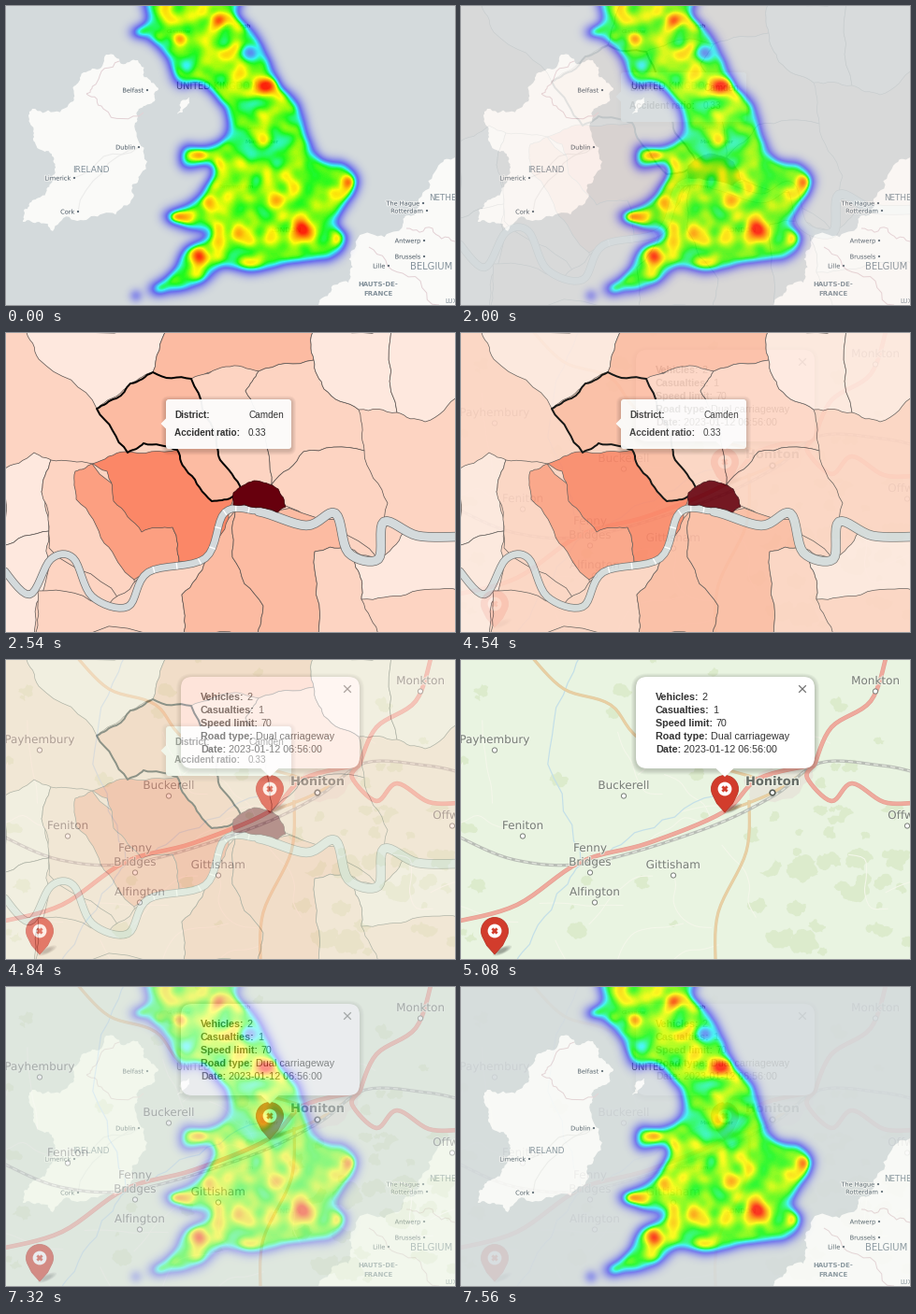
Recreate the animation shown at these times as a matplotlib script. Size 480 by 320 pixels, loop 7.62 s.

```python
from itertools import count

import numpy as np
import matplotlib.pyplot as plt
from matplotlib.animation import FuncAnimation
from matplotlib.colors import LinearSegmentedColormap
from matplotlib.patches import Circle, Ellipse, FancyBboxPatch, Polygon
from matplotlib.path import Path
from matplotlib.patheffects import withStroke

W, H, DPI = 480, 320, 100
STEP, LOOP = 20, 7620
PX = 72 / DPI  # points per pixel

fig = plt.figure(figsize=(W / DPI, H / DPI), dpi=DPI)
layer = count(1)  # later artists always lie on top


def stage(color="white"):
    ax = fig.add_axes([0, 0, 1, 1])
    ax.set(xlim=(0, W), ylim=(H, 0))
    ax.axis("off")
    area(ax, [(0, 0), (W, 0), (W, H), (0, H)], color)
    return ax


# ---------- drawing helpers ----------

def rough(pts, amp=0.1, depth=3, closed=True):
    """Break each side at a displaced midpoint; shared sides break alike."""
    pts = [tuple(map(float, p)) for p in pts]
    for _ in range(depth):
        out = []
        ends = pts[1:] + (pts[:1] if closed else [])
        for p, q in zip(pts, ends):
            (ax, ay), (bx, by) = sorted((p, q))
            k = amp * np.sin(12.9 * ax + 7.3 * ay + 3.1 * bx + 5.7 * by)
            out += [p, ((ax + bx) / 2 - k * (by - ay), (ay + by) / 2 + k * (bx - ax))]
        pts = out if closed else out + [pts[-1]]
    return pts


def smooth(pts, n=8):
    """Catmull-Rom curve through the points."""
    p = np.array([pts[0], *pts, pts[-1]], float)
    t = np.linspace(0, 1, n, endpoint=False)[:, None]
    parts = [
        0.5 * (2 * b + (c - a) * t + (2 * a - 5 * b + 4 * c - d) * t**2
               + (3 * b - a - 3 * c + d) * t**3)
        for a, b, c, d in zip(p, p[1:], p[2:], p[3:])
    ]
    return np.vstack(parts + [p[-1:]])


def put(ax, patch):
    patch.set_zorder(next(layer))
    ax.add_patch(patch)


def area(ax, pts, fill, edge="none", lw=0.0, **kw):
    put(ax, Polygon(pts, fc=fill, ec=edge, lw=lw * PX, joinstyle="round", **kw))


def dot(ax, x, y, r, fill, edge="none", lw=0.0):
    put(ax, Circle((x, y), r, fc=fill, ec=edge, lw=lw * PX))


def line(ax, pts, color, lw, **kw):
    x, y = np.array(pts, float).T
    kw.setdefault("solid_capstyle", "butt")
    ax.plot(x, y, color=color, lw=lw * PX, zorder=next(layer), **kw)


def cross(ax, x, y, r, color, lw):
    for s in (-r, r):
        line(ax, [(x - r, y - s), (x + r, y + s)], color, lw)


def label(ax, x, y, s, size, color="#333333", font="DejaVu Sans", halo=None, **kw):
    kw = {"ha": "center", "va": "center_baseline", **kw}
    t = ax.text(x, y, s, fontsize=size * PX, color=color, family=font,
                zorder=next(layer), **kw)
    if halo:
        t.set_path_effects([withStroke(linewidth=2 * PX, foreground=halo, alpha=0.8)])
    return t


def card(ax, x, y, w, h, r, tip, alpha=1.0):
    """White rounded box with a pointer and a soft shadow."""
    for k in range(5, 0, -1):
        put(ax, FancyBboxPatch((x, y + 1.5), w, h, fc="black", ec="none", alpha=0.035,
                               boxstyle=f"round,pad={k},rounding_size={r + k}"))
    put(ax, FancyBboxPatch((x, y), w, h, fc="white", ec="none", alpha=alpha,
                           boxstyle=f"round,pad=0,rounding_size={r}"))
    area(ax, tip, "white", alpha=alpha)


# ---------- scene 1: heat map ----------

BRITAIN = [(247, 11), (243, -20), (152, -20), (152, 16), (134, 28), (156, 37), (173, 56),
           (184, 84), (208, 83), (235, 112), (234, 140), (212, 151), (190, 151), (190, 172),
           (222, 172), (203, 207), (170, 224), (190, 237), (218, 244), (192, 260), (178, 285),
           (155, 302), (163, 307), (206, 299), (232, 279), (262, 284), (310, 274), (350, 269),
           (364, 248), (354, 230), (376, 190), (362, 170), (335, 164), (321, 135), (311, 103),
           (292, 83), (270, 36), (247, 11)]
HOT = [(143, 29), (186, 34), (228, 15), (278, 84), (207, 158), (180, 224), (246, 243),
       (207, 268), (166, 302), (365, 188)]
COLD = [(260, 49), (192, 64)]
IRELAND = [(107, 52), (141, 58), (163, 88), (150, 106), (138, 125), (144, 180), (136, 205),
           (91, 225), (50, 241), (18, 231), (28, 208), (48, 190), (51, 162), (30, 140),
           (28, 110), (72, 102), (80, 75)]
EUROPE = [(490, 145), (465, 168), (438, 222), (418, 241), (369, 262), (366, 296), (335, 315),
          (335, 330), (490, 330)]
TOWNS = [("Belfast", 151, 90), ("Dublin", 142, 151), ("Limerick", 73, 184), ("Cork", 77, 220),
         ("The Hague", 446, 211), ("Rotterdam", 450, 219), ("Antwerp", 447, 251),
         ("Brussels", 447, 268), ("Lille", 409, 278)]
COVERED = [("Edinburgh", 246, 21), ("Glasgow", 185, 27), ("Leeds", 266, 130),
           ("Manchester", 273, 145), ("Birmingham", 246, 193)]


def blur(a, sigma):
    r = int(4 * sigma)
    k = np.exp(-np.arange(-r, r + 1) ** 2 / (2 * sigma**2))
    k /= k.sum()
    for axis in (0, 1):
        a = np.apply_along_axis(np.convolve, axis, a, k, "same")
    return a


def heat():
    pad = 30
    x, y = np.meshgrid(np.arange(W) + 0.5, np.arange(-pad, H) + 0.5)

    def bump(cx, cy, s):
        return np.exp(-((x - cx) ** 2 + (y - cy) ** 2) / (2 * s * s))

    inside = Path(smooth(BRITAIN)).contains_points(np.c_[x.ravel(), y.ravel()])
    mask = blur(inside.reshape(x.shape).astype(float), 4.8)
    noise = blur(np.random.default_rng(12).normal(size=x.shape), 5.5)
    v = 0.75 + 0.04 * noise / noise.std()
    v += sum(0.14 * bump(*p, 6) for p in HOT) - sum(0.22 * bump(*p, 6) for p in COLD)
    v += 0.27 * bump(317, 237, 7.5)
    v = np.clip(v, 0, 0.98) * mask**0.72 + 0.27 * bump(139, 310, 5)
    v = np.clip(v[pad:], 0, 0.98)
    cmap = LinearSegmentedColormap.from_list("heat", [
        (0, "blue"), (0.4, "blue"), (0.6, "cyan"), (0.7, "lime"), (0.8, "yellow"), (1, "red")])
    rgba = cmap(v)
    rgba[..., 3] = np.clip(v * 1.24, 0, 0.95)
    return rgba


def draw_heatmap():
    ax = stage("#d4dadc")
    land, ink, border = "#fafaf8", "#82909a", "#e3d1d5"
    for pts in (IRELAND, EUROPE, [(196, 98), (192, 108), (183, 116), (186, 107)]):
        area(ax, rough(pts, 0.2, 4), land)
    for _, x, y in TOWNS[2:4]:
        line(ax, rough([(142, 151), (x, y)], 0.1, 3, False), "#ebebea", 1)
    for pts in ([(86, 94), (97, 82), (121, 59)], [(86, 94), (104, 110), (147, 114)],
                [(388, 258), (424, 286), (463, 320)], [(428, 238), (456, 238), (480, 252)]):
        line(ax, rough(pts, 0.2, 3, False), border, 1)

    for s, x, y in TOWNS:
        label(ax, x - 3.5, y, s, 6.6, "#56636e", halo=land, ha="right")
        dot(ax, x, y, 1.1, "#56636e")
    label(ax, 91, 174, "IRELAND", 9, ink)
    label(ax, 452, 204, "NETHERLANDS", 8.8, ink, ha="left")
    label(ax, 455, 278, "BELGIUM", 10, ink)
    label(ax, 469, 315, "LUXEMBOURG", 7, ink, ha="left")
    for y, s in ((298, "HAUTS-DE-"), (307, "FRANCE")):
        label(ax, 398, y, s, 7, ink, weight="bold")
    label(ax, 226, 85, "UNITED KINGDOM", 9.6, "#50585c")
    label(ax, 299, 239, "LONDON", 7.5, "#1c2226")
    for s, x, y in COVERED:
        label(ax, x, y, s, 6.2, "#2f373b")
    ax.imshow(heat(), extent=(0, W, H, 0), aspect="auto", interpolation="nearest",
              zorder=next(layer))


# ---------- scene 2: districts ----------

PALE, LIGHT, MID = "#fee8de", "#fdd4c2", "#fcbba2"
DISTRICTS = [
    (PALE, [(20, -5), (35, 28), (97, 81), (130, 58), (157, 42), (173, -5)]),
    (PALE, [(-5, 146), (30, 128), (48, 136), (38, 170), (46, 212), (-5, 228)]),
    (PALE, [(-5, 228), (46, 212), (45, 255), (30, 325), (-5, 325)]),
    (LIGHT, [(48, 136), (92, 140), (137, 264), (130, 293), (46, 230), (38, 170)]),
    (LIGHT, [(30, 325), (34, 276), (110, 290), (152, 255), (214, 243), (188, 280), (190, 325)]),
    (MID, [(173, -5), (157, 42), (198, 49), (270, 41), (329, 29), (328, -5)]),
    (LIGHT, [(198, 49), (235, 36), (270, 41), (256, 62), (277, 100), (284, 162), (252, 168)]),
    (LIGHT, [(270, 41), (329, 29), (340, 60), (377, 82), (383, 126), (318, 127), (284, 162),
             (277, 100), (256, 62)]),
    (PALE, [(328, -5), (329, 29), (340, 60), (377, 82), (418, 85), (412, -5)]),
    (PALE, [(412, -5), (418, 85), (448, 95), (485, 66), (485, -5)]),
    (LIGHT, [(284, 162), (318, 127), (383, 126), (408, 182), (398, 242), (299, 185)]),
    (MID, [(214, 243), (245, 190), (242, 240), (275, 292), (268, 325), (190, 325), (188, 280)]),
    (MID, [(245, 190), (360, 200), (364, 229), (330, 234), (334, 325), (268, 325), (275, 292),
           (242, 240)]),
    (LIGHT, [(330, 234), (364, 229), (378, 258), (380, 285), (400, 325), (334, 325)]),
    (PALE, [(364, 229), (398, 242), (425, 213), (485, 219), (485, 276), (428, 280), (380, 285),
            (378, 258)]),
    ("#fc9f81", [(92, 140), (178, 208), (185, 245), (137, 264), (105, 225), (75, 178), (74, 148)]),
    ("#fb8767", [(92, 140), (128, 127), (183, 125), (220, 180), (243, 175), (227, 220),
                 (205, 246), (185, 245), (178, 208), (145, 213), (115, 180), (108, 148)]),
]
CAMDEN = [(97, 81), (118, 70), (133, 54), (157, 42), (198, 49), (225, 112), (229, 136),
          (252, 168), (241, 176), (220, 180), (195, 150), (183, 125), (147, 118), (130, 128)]
CITY = [(243, 171), (265, 158), (291, 167), (299, 186), (290, 192), (243, 184)]
THAMES = [(-5, 250), (25, 280), (48, 242), (72, 241), (92, 282), (130, 293), (152, 256),
          (213, 241), (234, 192), (270, 191), (321, 206), (352, 193), (366, 235), (398, 242),
          (404, 202), (440, 217), (485, 218)]


def draw_districts():
    ax = stage(LIGHT)
    for fill, pts in DISTRICTS:
        area(ax, rough(pts, 0.07), fill, "#55504e", 0.7)
    river = smooth(THAMES)
    upper, lower = np.split(river, [9 * 8])
    for extra, color in ((1.4, "#6b6866"), (0, "#d4dadc")):
        line(ax, upper, color, 7 + extra, solid_capstyle="round")
        line(ax, lower, color, 9 + extra, solid_capstyle="round")
    for i in range(49, 72, 3):  # bridges
        (x, y), (u, v) = river[i], river[i + 1] - river[i]
        n = 3.4 * np.array([-v, u]) / np.hypot(u, v)
        line(ax, [(x, y) - n, (x, y) + n], "white", 1.4)
    area(ax, rough(CAMDEN, 0.07), MID, "black", 2.0)
    area(ax, rough(CITY, 0.07), "#67000d", "#300008", 0.7)

    card(ax, 171, 71, 134, 53, 3, [(171, 91.5), (165.5, 97), (171, 102.5)], 0.95)
    opts = dict(font="Liberation Sans", ha="left", va="baseline")
    for y, name, value in ((91.3, "District:", "Camden"), (110.3, "Accident ratio:", "0.33")):
        label(ax, 180, y, name, 10, weight="bold", **opts)
        label(ax, 259, y, value, 10, **opts)


# ---------- scene 3: accident map ----------

VILLAGES = [("Monkton", 443, 21), ("Payhembury", 36, 84), ("Buckerell", 174, 133),
            ("Feniton", 66, 176), ("Bridges", 138, 215), ("Alfington", 143, 247),
            ("Gittisham", 227, 218), ("Offwell", 477, 165)]
TRUNK = [(-5, 280), (60, 262), (128, 216), (200, 196), (280, 163), (318, 127), (378, 112)]
EASTWARD = [(378, 112), (370, 126), (396, 151), (418, 132), (452, 152), (485, 153)]
NORTHWARD = [(378, 112), (396, 72), (438, 44), (455, -5)]
RAILWAY = [(-5, 188), (58, 214), (138, 217), (260, 181), (335, 145), (384, 110), (450, 113),
           (485, 120)]
LANES = [[(74, -5), (110, 31), (160, 48), (200, 90), (318, 127)],
         [(280, 163), (333, 142), (378, 112)],
         [(308, 150), (305, 205), (275, 270), (272, 325)]]
STREAMS = [[(128, 216), (100, 258), (58, 325)], [(140, 215), (195, 182), (275, 140)],
           [(128, -5), (95, 95), (128, 216)]]


def marker(ax, x, y):
    """Pin with its tip at (x, y)."""
    red = "#d23c2c"
    for k in range(4):
        put(ax, Ellipse((x + 8, y - 4), 22 - 4 * k, 7 - 1.2 * k, angle=-25,
                        fc="black", ec="none", alpha=0.09))
    a = np.radians(np.linspace(155, 385, 50))
    head = np.c_[x + 14.5 * np.cos(a), y - 25 + 14.5 * np.sin(a)]
    side = [(x + 8.5, y - 9.5), (x, y), (x - 8.5, y - 9.5)]
    area(ax, np.vstack([head, side]), red, "#b73427", 0.8)
    dot(ax, x, y - 25, 7.4, "white")
    cross(ax, x, y - 25, 2.6, red, 2.8)


def countryside(ax):
    rng = np.random.default_rng(5)
    for i in range(64):  # woods, denser in the south-east
        dense = i < 26
        cx, cy = rng.uniform((330, 150) if dense else (0, 0), (W, H))
        r = rng.uniform(4, 18 if dense else 11)
        a = np.sort(rng.uniform(0, 2 * np.pi, 8))
        area(ax, rough(np.c_[cx + r * np.cos(a), cy + 0.8 * r * np.sin(a)], 0.2), "#dcebcc")
    for _ in range(26):  # tracks
        turn = np.cumsum(np.r_[rng.uniform(0, 6.3), rng.normal(0, 0.5, 5)])
        walk = 18 * np.cumsum(np.c_[np.cos(turn), np.sin(turn)], axis=0)
        line(ax, smooth(rng.uniform((0, 0), (W, H)) + walk, 4), "#f4f7ea", 1.1)


def draw_accidents():
    ax = stage("#e9f4e1")
    countryside(ax)
    area(ax, rough([(302, 128), (350, 113), (376, 108), (374, 128), (308, 150)], 0.15), "#e7e6da")
    for pts in STREAMS:
        line(ax, rough(smooth(pts, 4), 0.15, 1, False), "#c3dfe8", 1.2)
    for pts in LANES:
        line(ax, smooth(pts), "#dfcda0", 3.2)
        line(ax, smooth(pts), "#e9cfa4", 2.2)
    line(ax, smooth(RAILWAY), "#b9bdb6", 3.2)
    line(ax, smooth(RAILWAY), "#e2e6dd", 1.3, dashes=(4, 3))
    for pts in (EASTWARD, NORTHWARD, TRUNK):
        line(ax, smooth(pts), "#e39c90", 4.6)
        line(ax, smooth(pts), "#efaa9d", 3.4)

    ink, halo = "#7b817a", "#f2f8ec"
    label(ax, 138, 200, "Fenny", 12, ink, halo=halo)
    for s, x, y in VILLAGES:
        label(ax, x, y, s, 12, ink, halo=halo)
        dot(ax, x, y + 12.5, 2.6, "white", ink, 1)
    label(ax, 333, 129, "Honiton", 13, "#666c66", halo=halo, weight="bold")
    dot(ax, 333, 142, 2.8, "white", "#555b55", 1.6)

    marker(ax, 36, 315)
    marker(ax, 282, 163)
    card(ax, 187, 18, 191, 98, 12, [(272, 115.5), (282, 125), (292, 115.5)])
    rows = (("Vehicles:", "2"), ("Casualties:", "1"), ("Speed limit:", "70"),
            ("Road type:", "Dual carriageway"), ("Date:", "2023-01-12 06:56:00"))
    opts = dict(font="Liberation Sans", ha="left", va="baseline")
    for i, (name, value) in enumerate(rows):
        y = 43 + 14 * i
        head = label(ax, 208, y, name, 10.8, weight="bold", **opts)
        end = ax.transData.inverted().transform(head.get_window_extent())[1, 0]
        label(ax, end + 3, y, value, 10.8, **opts)
    cross(ax, 365, 31, 3.8, "#757575", 1.3)


# ---------- slideshow with cross-fades ----------

def snapshot(draw):
    fig.clear()
    draw()
    fig.canvas.draw()
    return np.array(fig.canvas.buffer_rgba())[..., :3].astype(float)


scenes = [snapshot(d) for d in (draw_heatmap, draw_districts, draw_accidents)]
fig.clear()
picture = stage().imshow(scenes[0].astype(np.uint8), extent=(0, W, H, 0), aspect="auto",
                         interpolation="nearest", zorder=next(layer))

HOLD, FADE, CYCLE = 2000, 60, 2540


def update(i):
    n, t = divmod(i * STEP, CYCLE)
    mix = 0 if t < HOLD else ((t - HOLD) // FADE + 1) / 10
    a, b = scenes[n], scenes[(n + 1) % 3]
    picture.set_data(np.round(a + (b - a) * mix).astype(np.uint8))
    return [picture]


anim = FuncAnimation(fig, update, frames=LOOP // STEP, interval=STEP,
                     repeat=True, repeat_delay=0, blit=False)
plt.show()
```
